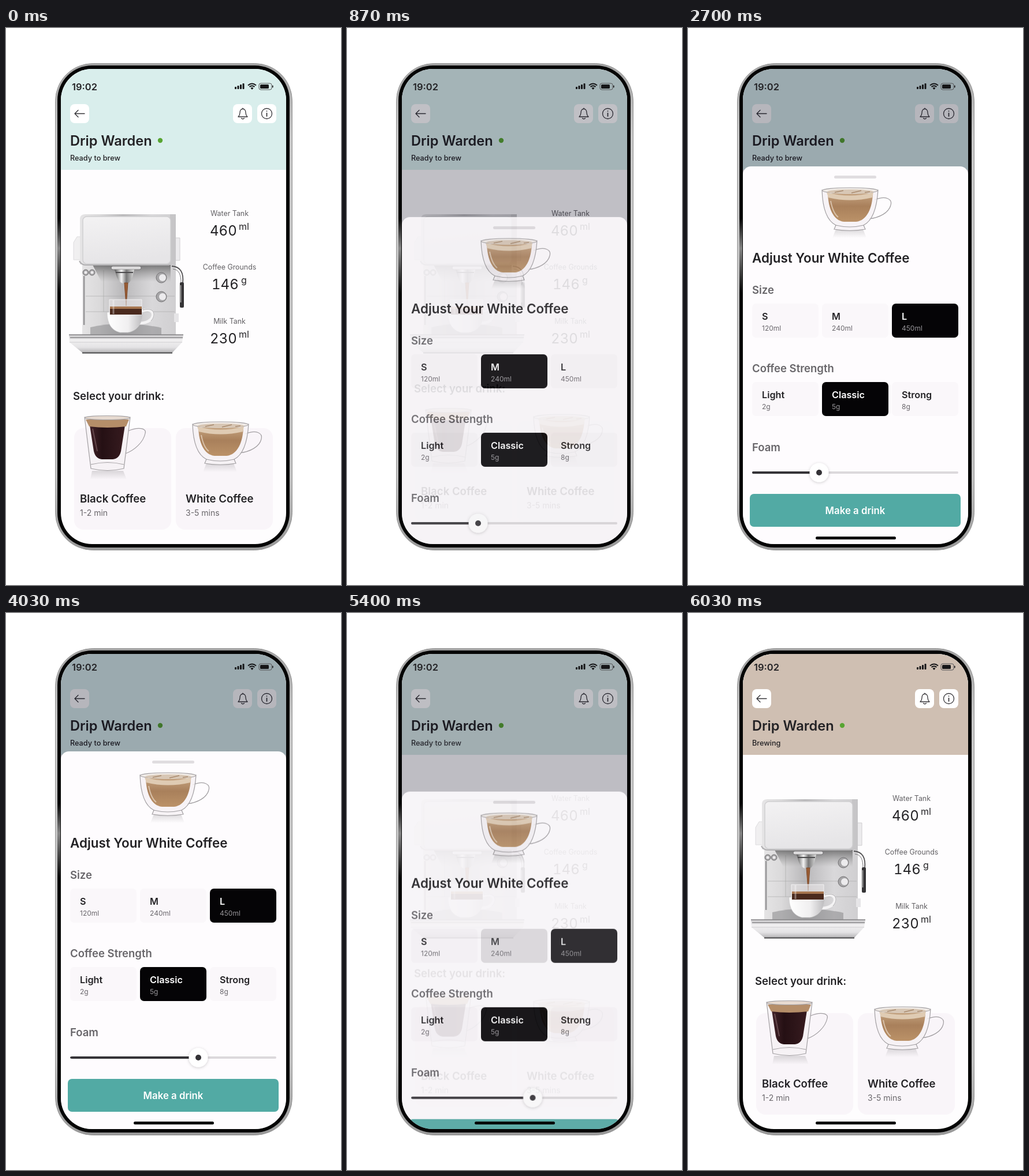
Animation of 580 by 966 pixels, one loop 6160 ms. Source, as an HTML page:

```html
<!DOCTYPE html>
<html lang="en">
<head>
<meta charset="utf-8">
<title>Coffee machine app</title>
<style>
  html, body { margin: 0; width: 100%; height: 100%; overflow: hidden; background: #fff; }
  svg { display: block; width: 100vw; height: 100vh; font-family: Inter, sans-serif; fill: none; }
  text { fill: #232225; }
  .title { font-size: 23.6px; font-weight: 600; }
  .heading { font-size: 22.4px; font-weight: 600; }
  .strong { font-size: 18.6px; font-weight: 600; }
  .section { font-size: 18.5px; font-weight: 600; fill: #68666a; }
  .status { font-size: 12.7px; font-weight: 500; }
  .label { font-size: 12.4px; text-anchor: middle; fill: #626064; }
  .value { font-size: 24px; font-variant-numeric: tabular-nums; }
  .unit { font-size: 16px; }
  .note { font-size: 14px; fill: #69666a; }
  .option { font-size: 16.2px; font-weight: 600; }
  .amount { font-size: 12px; fill: #69666b; }
  .chosen .option { fill: #fff; }
  .chosen .amount { fill: #98969a; }
  .line { stroke: #333236; stroke-width: 1.3; stroke-linecap: round; stroke-linejoin: round; }
  .glass { stroke: #a19ea1; stroke-width: 1.2; }
  #fill { transform-origin: 111px 0; }
</style>
</head>
<body>
<svg viewBox="0 0 580 966">
  <defs>
    <clipPath id="screen"><rect x="95" y="71" width="390" height="824" rx="54"/></clipPath>
    <linearGradient id="metal" x2="0" y2="1">
      <stop stop-color="#a2a2a2"/><stop offset=".15" stop-color="#c8c8c8"/>
      <stop offset=".85" stop-color="#c2c2c2"/><stop offset="1" stop-color="#989898"/>
    </linearGradient>
    <linearGradient id="glint" x2="0" y2="1">
      <stop stop-color="#ddd" stop-opacity="0"/><stop offset=".4" stop-color="#ddd"/>
      <stop offset="1" stop-color="#ddd" stop-opacity="0"/>
    </linearGradient>
    <linearGradient id="panel" x2=".2" y2="1">
      <stop stop-color="#f3f2f3"/><stop offset="1" stop-color="#e6e5e7"/>
    </linearGradient>
    <linearGradient id="body">
      <stop stop-color="#e6e5e6"/><stop offset=".2" stop-color="#dbdadb"/><stop offset=".45" stop-color="#b9b8ba"/>
      <stop offset=".75" stop-color="#d9d8da"/><stop offset="1" stop-color="#d0cfd1"/>
    </linearGradient>
    <linearGradient id="shade" x2="0" y2="1">
      <stop stop-color="#444" stop-opacity=".65"/><stop offset="1" stop-color="#777" stop-opacity="0"/>
    </linearGradient>
    <linearGradient id="chrome">
      <stop stop-color="#555"/><stop offset=".35" stop-color="#f4f4f4"/>
      <stop offset=".6" stop-color="#777"/><stop offset="1" stop-color="#ddd"/>
    </linearGradient>
    <linearGradient id="tray" x2="0" y2="1">
      <stop stop-color="#c9c8ca"/><stop offset=".3" stop-color="#f1f0f1"/>
      <stop offset=".7" stop-color="#e4e3e5"/><stop offset="1" stop-color="#b5b4b6"/>
    </linearGradient>
    <linearGradient id="porcelain">
      <stop stop-color="#fff"/><stop offset=".6" stop-color="#f0eff0"/><stop offset="1" stop-color="#bdbcbe"/>
    </linearGradient>
    <linearGradient id="latte" x2="0" y2="1">
      <stop stop-color="#c3a17e"/><stop offset=".45" stop-color="#a9805b"/><stop offset="1" stop-color="#bb9268"/>
    </linearGradient>
    <linearGradient id="dark">
      <stop stop-color="#44242a"/><stop offset=".35" stop-color="#251014"/><stop offset="1" stop-color="#371b1f"/>
    </linearGradient>
    <linearGradient id="mirror" x2="0" y2="1">
      <stop stop-color="#aaa7aa" stop-opacity=".4"/><stop offset="1" stop-color="#aaa7aa" stop-opacity="0"/>
    </linearGradient>
    <filter id="soft" x="-50%" y="-50%" width="200%" height="200%">
      <feDropShadow dx="0" dy="1" stdDeviation="2.5" flood-opacity=".2"/>
    </filter>

    <g id="latteCup">
      <path d="M347 755L341 770H400L394 755Z" fill="url(#mirror)"/>
      <path d="M414 704C434 696 445 703 442 713C439 726 423 735 404 737" class="glass" stroke-width="2"/>
      <path d="M323 687C324 719 331 740 347 748L344 755Q371 760 398 755L395 748C411 740 418 719 420 687Z" fill="#f6f3f5" fill-opacity=".85" class="glass"/>
      <path d="M333 693C334 718 342 740 361 742H382C401 740 410 718 411 693Z" fill="url(#latte)"/>
      <path d="M331 691Q371 702 412 691L410 700Q371 709 334 700Z" fill="#dfcbb3"/>
      <ellipse cx="371.500" cy="688" rx="48" ry="5" fill="#f1ece8" class="glass"/>
      <ellipse cx="372" cy="690" rx="40" ry="4" fill="#d8c7b5"/>
      <path d="M345 691L360 688M374 692L391 688M397 691L406 690" stroke="#a88a6e" stroke-width="1.500"/>
      <path d="M338 706Q342 727 351 734" stroke="#f4e7d8" stroke-width="2" opacity=".6"/>
      <path d="M347 748Q371 754 395 748" class="glass"/>
    </g>
  </defs>

  <rect x="85.500" y="61.500" width="410" height="844" rx="65" fill="url(#metal)" stroke="#989898"/>
  <rect x="89" y="65" width="402" height="836" rx="60" fill="#050505"/>
  <rect x="89" y="330" width="5" height="130" fill="url(#glint)" opacity=".6"/>

  <g clip-path="url(#screen)">
    <rect x="95" y="71" width="390" height="824" fill="#fefdfe"/>
    <rect x="95" y="71" width="390" height="175" fill="#d9eeec"/>
    <rect id="warm" x="95" y="71" width="390" height="175" fill="#cfbfb2"/>

    <g fill="#fff">
      <rect x="111" y="132" width="33" height="33" rx="8"/>
      <rect x="393" y="132" width="33" height="33" rx="8"/>
      <rect x="435" y="132" width="33" height="33" rx="8"/>
    </g>
    <g class="line">
      <path d="M136 148.500H119M125 142.500L119 148.500L125 154.500"/>
      <path d="M402 154H418Q415 151 415 147C415 138 405 138 405 147Q405 151 402 154ZM407.500 156.500Q410 159 412.500 156.500M410 140V139"/>
      <circle cx="451.500" cy="148.500" r="9"/>
      <path d="M451.500 147.500V153M451.500 144V144.200" stroke-width="1.700"/>
    </g>
    <text class="title" x="111" y="204">Drip Warden</text>
    <circle cx="267" cy="195" r="4.200" fill="#58a532"/>
    <text class="status" id="ready" x="111" y="230">Ready to brew</text>
    <text class="status" id="brewing" x="111" y="230">Brewing</text>

    <g id="machine">
      <path d="M117 372L123 362H134V402H117Z" fill="#f0eff0" stroke="#dddcde"/>
      <path d="M288 364H301V403H288Z" fill="#ecebed" stroke="#cfced0"/>
      <path d="M128 330Q129 323 137 323H294V535H132V410H128Z" fill="url(#body)"/>
      <path d="M134 465H292M134 492H292M169 420V492" stroke="#a5a4a6" opacity=".6"/>
      <path d="M150 411H285V440H165Z" fill="url(#shade)"/>
      <path d="M284 323H294V411H280Z" fill="#c6c5c7"/>
      <rect x="133" y="327" width="152" height="82" rx="7" fill="url(#panel)" stroke="#d0cfd1" stroke-width="1.500"/>
      <path d="M127 404Q130 411 139 411H283" stroke="#b2b1b3" stroke-width="2"/>
      <rect x="182" y="413" width="52" height="6" rx="3" fill="#dddcdd" stroke="#747375"/>
      <path d="M188 419H222L219 432Q216 440 211 443H202Q195 440 192 432Z" fill="url(#chrome)"/>
      <path d="M190 424H220" stroke="#4c4b4d" stroke-width="2"/>
      <path d="M205 442L208 482L211 442Z" fill="#985c34" stroke="#7d4929"/>
      <g fill="#a6a5a7" stroke="#737274">
        <circle cx="269" cy="433" r="9"/><circle cx="269" cy="466" r="9"/>
        <circle cx="138" cy="424" r="5"/><circle cx="149" cy="424" r="5"/>
      </g>
      <g fill="#ecebed">
        <circle cx="271" cy="433" r="6"/><circle cx="271" cy="466" r="6"/>
        <circle cx="138" cy="424" r="2.500"/><circle cx="149" cy="424" r="2.500"/>
      </g>
      <path d="M136 430V515" stroke="#8d8c8e" stroke-width="4"/>
      <path d="M137 430V515" stroke="#eee" stroke-width="1.500"/>
      <path d="M287 413C302 414 308 424 306 443" stroke="#504f51" stroke-width="1.800"/>
      <path d="M289 418C300 419 303 428 303 443" stroke="#777678"/>
      <rect x="301" y="441" width="7" height="44" rx="2" fill="#353436"/>
      <path d="M302.500 446V476" stroke="#bbb" stroke-width="1.500"/>
      <path d="M291 495H299V510H291Z" fill="#e6e5e7"/>
      <path d="M146 519Q205 506 269 520V532H146Z" fill="#777678" opacity=".45"/>
      <path d="M235 491C254 484 259 498 250 506Q243 512 230 512" stroke="#f4f3f4" stroke-width="5"/>
      <path d="M237 489C258 483 260 499 251 508" stroke="#aaa9ab"/>
      <path d="M175 493H236C237 513 226 526 211 528H197C182 524 175 512 175 493Z" fill="url(#porcelain)" stroke="#cbcacc" stroke-width=".7"/>
      <path d="M179 471H235V497H179Z" fill="#e5e2e3" fill-opacity=".65" stroke="#f2f1f2"/>
      <path d="M180 483H235V497H180Z" fill="#4a2a1e"/>
      <path d="M180 483H235V487H180Z" fill="#a77650"/>
      <path d="M186 472V496" stroke="#fff" stroke-width="3" opacity=".35"/>
      <path d="M109 532H307L305 545L288 563H132L110 545Z" fill="url(#tray)"/>
      <path d="M109 532H307M111 537H306" stroke="#858486" stroke-width="1.500"/>
      <path d="M110 545H305" stroke="#d0cfd1"/>
      <path d="M132 563.500H288" stroke="#49484a" stroke-width="1.800"/>
    </g>

    <text class="label" x="387" y="326">Water Tank</text>
    <text class="value" x="353" y="360">460</text><text class="unit" x="403" y="350">ml</text>
    <text class="label" x="387" y="419">Coffee Grounds</text>
    <text class="value" x="356" y="453">146</text><text class="unit" x="407" y="443">g</text>
    <text class="label" x="387" y="513">Milk Tank</text>
    <text class="value" x="353" y="547">230</text><text class="unit" x="403" y="537">ml</text>

    <g id="drinks">
      <text class="strong" x="116" y="645">Select your drink:</text>
      <rect x="118" y="694" width="168" height="176" rx="16" fill="#f9f5f9"/>
      <rect x="294" y="694" width="168" height="176" rx="16" fill="#f9f5f9"/>
      <path d="M149 768L146 783H209L203 768Z" fill="url(#mirror)"/>
      <path d="M211 699C229 691 244 694 241 703C238 718 223 732 207 738" class="glass" stroke-width="2"/>
      <path d="M136 675L147 764Q176 771 204 764L215 675Z" fill="#f6f3f5" fill-opacity=".85" class="glass"/>
      <path d="M144 683L152 734Q155 747 166 748H185Q196 747 199 734L207 683Z" fill="url(#dark)"/>
      <path d="M138 679H213L208 691Q175 695 144 691Z" fill="#b58e69"/>
      <ellipse cx="175.500" cy="676" rx="39" ry="3.500" fill="#e7dad0" class="glass"/>
      <path d="M150 695L158 734" stroke="#85676a" stroke-width="2" opacity=".6"/>
      <path d="M147 757Q176 750 204 757" class="glass"/>
      <use href="#latteCup"/>
      <text class="strong" x="128" y="823">Black Coffee</text><text class="note" x="128" y="846">1-2 min</text>
      <text class="strong" x="311" y="823">White Coffee</text><text class="note" x="311" y="846">3-5 mins</text>
    </g>

    <rect id="dim" x="95" y="71" width="390" height="824" fill="#06041a"/>

    <g id="bar">
      <text x="114" y="107.500" font-size="16.500" font-weight="600">19:02</text>
      <g fill="#161618">
        <rect x="396" y="102" width="3" height="4" rx="1"/><rect x="400.500" y="100" width="3" height="6" rx="1"/>
        <rect x="405" y="98" width="3" height="8" rx="1"/><rect x="409.500" y="96" width="3" height="10" rx="1"/>
        <path d="M423.500 104Q426 102 428.500 104L426 107Z"/>
        <rect x="440" y="98" width="15" height="7" rx="1.500"/><rect x="461" y="99.500" width="1.500" height="4" rx=".7"/>
      </g>
      <path d="M419 99.500Q426 93.500 433 99.500M421.500 102Q426 98.500 430.500 102" stroke="#161618" stroke-width="2"/>
      <rect x="438" y="96" width="22" height="11" rx="3" stroke="#555457"/>
    </g>

    <g id="sheet">
      <rect x="95" y="240" width="390" height="760" rx="14" fill="#fefcfe"/>
      <rect x="253" y="256" width="73" height="5" rx="2.500" fill="#e0dde0"/>
      <use href="#latteCup" x="-91" y="-406"/>
      <text class="heading" x="111" y="407">Adjust Your White Coffee</text>
      <text class="section" x="111" y="461">Size</text>
      <text class="section" x="111" y="597">Coffee Strength</text>
      <g id="options"></g>
      <text class="section" x="111" y="734">Foam</text>
      <rect x="111" y="769" width="357" height="4" rx="2" fill="#dcd9dc"/>
      <rect id="fill" x="111" y="769" width="116" height="4" rx="2" fill="#343236"/>
      <g id="knob">
        <circle cx="227" cy="771" r="16.500" fill="#fff" filter="url(#soft)"/>
        <circle cx="227" cy="771" r="5" fill="#343236"/>
      </g>
      <rect x="107" y="808" width="365" height="57" rx="7" fill="#52aaa4"/>
      <text x="289.500" y="843" font-size="16.800" font-weight="600" text-anchor="middle" style="fill:#fff">Make a drink</text>
    </g>
    <rect id="home" x="221" y="882" width="139" height="5" rx="2.500" fill="#050505"/>
  </g>
</svg>
<script>
const LOOP = 6160;
const OPEN = [440, 1040], SIZE = [2240, 2700], FOAM = [3200, 3730], CLOSE = [5300, 5900];
const EASE = 'cubic-bezier(.3,.04,.57,1)';
const TRAVEL = 641;

const face = (x, y, name, amount, fill) => `
  <rect x="${x}" y="${y}" width="115" height="59" rx="7" fill="${fill}"/>
  <text class="option" x="${x + 17}" y="${y + 28}">${name}</text>
  <text class="amount" x="${x + 17}" y="${y + 47}">${amount}</text>`;

const selectable = ['M', 'L', 'Classic'];
const row = (y, items) => items.map(([name, amount], i) => {
  const x = 111 + 121 * i;
  const chosen = selectable.includes(name)
    ? `<g class="chosen" id="pick${name}">${face(x, y, name, amount, '#050406')}</g>` : '';
  return face(x, y, name, amount, '#faf7fa') + chosen;
}).join('');

document.querySelector('#options').innerHTML =
  row(478, [['S', '120ml'], ['M', '240ml'], ['L', '450ml']]) +
  row(614, [['Light', '2g'], ['Classic', '5g'], ['Strong', '8g']]);

// Each step is [[start, end], value]; the value holds between steps.
function move(id, prop, first, ...steps) {
  const frames = [{ offset: 0, [prop]: first }];
  let value = first;
  for (const [[start, end], next] of steps) {
    frames.push({ offset: start / LOOP, [prop]: value, easing: EASE });
    frames.push({ offset: end / LOOP, [prop]: next });
    value = next;
  }
  frames.push({ offset: 1, [prop]: value });
  document.getElementById(id).animate(frames, { duration: LOOP, iterations: Infinity });
}

const up = y => `translateY(${y}px)`;
const right = x => `translateX(${x}px)`;

move('sheet', 'transform', up(TRAVEL), [OPEN, up(0)], [CLOSE, up(TRAVEL)]);
move('sheet', 'opacity', 0, [OPEN, 1], [CLOSE, 0]);
move('dim', 'opacity', 0, [OPEN, .29], [CLOSE, 0]);
move('drinks', 'transform', up(0), [OPEN, up(-15)], [CLOSE, up(0)]);
move('home', 'transform', up(TRAVEL), [OPEN, up(0)]);
move('pickM', 'opacity', 1, [SIZE, 0], [CLOSE, 1]);
move('pickL', 'opacity', 0, [SIZE, 1], [CLOSE, 0]);
move('knob', 'transform', right(0), [FOAM, right(106)], [CLOSE, right(0)]);
move('fill', 'transform', 'scaleX(1)', [FOAM, 'scaleX(1.914)'], [CLOSE, 'scaleX(1)']);
move('bar', 'transform', up(0), [FOAM, up(-8)]);
move('warm', 'opacity', 0, [CLOSE, 1]);
move('ready', 'opacity', 1, [CLOSE, 0]);
move('brewing', 'opacity', 0, [CLOSE, 1]);
</script>
</body>
</html>
```
